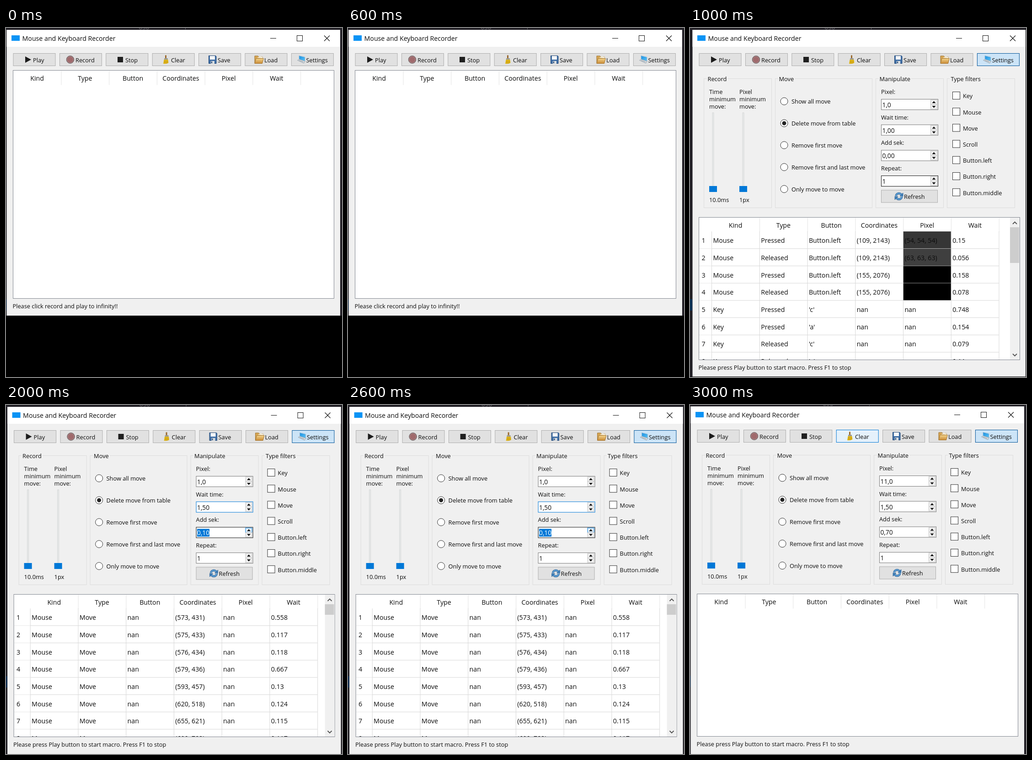
An HTML page for the animation above (4 s loop, 735 px wide and 762 px high).

```html
<!DOCTYPE html>
<html lang="en">
<head>
<meta charset="utf-8">
<title>Mouse and Keyboard Recorder</title>
<style>
  html, body { margin: 0; width: 100%; height: 100%; overflow: hidden; background: #211f25; }
  svg { display: block; width: 735px; height: 762px; }
  text { font: 12.8px "Open Sans", "Noto Sans", sans-serif; fill: #0c0c0c; white-space: pre; }
  .big { font-size: 14.2px; }
  .num { font-size: 13.8px; }
  .mid { text-anchor: middle; }
  .legend { paint-order: stroke; stroke: #f0f0f0; stroke-width: 6px; }
  .screen { visibility: hidden; animation: show 4s step-end infinite; }
  @keyframes show {
    0% { visibility: visible; }
    25%, 100% { visibility: hidden; }
  }
</style>
</head>
<body>
<svg id="stage" viewBox="0 0 735 762">
  <defs>
    <linearGradient id="folder" x2="0" y2="1"><stop stop-color="#f3d48c"/><stop offset="1" stop-color="#c98a35"/></linearGradient>
    <linearGradient id="glass" x2="1" y2="1"><stop stop-color="#1a8fe0"/><stop offset="1" stop-color="#5cc3f7"/></linearGradient>
    <radialGradient id="disc"><stop stop-color="#a4696c"/><stop offset=".75" stop-color="#9c6a6c"/><stop offset="1" stop-color="#8a7273"/></radialGradient>
    <clipPath id="view"><rect x="16" y="414" width="681" height="310"/></clipPath>
  </defs>
</svg>
<script>
const rect = (x, y, w, h, fill, stroke) =>
  `<rect x="${x}" y="${y}" width="${w}" height="${h}" fill="${fill}"${stroke ? ` stroke="${stroke}"` : ''}/>`;
const path = (d, fill = 'none', stroke = 'none', w = 1) =>
  `<path d="${d}" fill="${fill}" stroke="${stroke}" stroke-width="${w}"/>`;
const circle = (x, y, r, fill, stroke = 'none', w = 1) =>
  `<circle cx="${x}" cy="${y}" r="${r}" fill="${fill}" stroke="${stroke}" stroke-width="${w}"/>`;
const text = (x, y, s, cls = '', fill) =>
  `<text x="${x}" y="${y}" class="${cls}"${fill ? ` style="fill:${fill}"` : ''}>${s}</text>`;
const each = (list, fn) => list.map(fn).join('');

const HEADS = ['Kind', 'Type', 'Button', 'Coordinates', 'Pixel', 'Wait'];
const COL = 104.75, ROW = 37.7;

const icons = {
  Play: path('M42 62V76L55 69Z', '#1c1c1c'),
  Record: circle(140.5, 69, 8.3, 'url(#disc)', '#6f6668') + circle(140.5, 69, 6.6, 'none', '#b98a8b', .8),
  Stop: rect(244, 63, 12, 12, '#1f1f1f'),
  Clear: path('M348 59.5h3v7h-3z', '#9a6a2f') + path('M346 66h8v3h-8z', '#9b9b96')
    + path('M345.5 69h9l1 7q-4 3-11.5 2z', '#e0b81c') + path('M347 71v6M350 71v7M353 71v6', 'none', '#b98a0e', .8),
  Save: path('M443.5 60.5h15l1.5 1.5v15.5h-16.5z', '#3f6ea5', '#254a78') + rect(446, 61, 11, 8, '#f4f6f8')
    + rect(448, 72, 8, 6, '#d9dde0') + rect(449, 73, 2, 4, '#2b4d78'),
  Load: path('M544 77V61h7l2 2h8v4', '#d6a552', '#9d7434') + path('M544 77.5l3-11h16.5l-3 11z', 'url(#folder)', '#a87a35')
    + path('M549 65l6-3 6 1v3z', '#f6efdc'),
  Settings: path('M641 60.5l13 3v9l-13-4z', 'url(#glass)', '#a9c3d6') + path('M637.5 70.5l4-2 13 4-3 4.5z', '#d5dbe0', '#8f9ba5', .8)
    + path('M641 70.8l9.5 3.3', 'none', '#8f9ba5')
};
const LABEL_X = [59, 152, 261, 361, 463, 565, 656.5];

function button(x, y, w, h, state) {
  const [fill, line] = { on: ['#cce4f7', '#005499'], hover: ['#e5f1fb', '#0078d7'] }[state] || ['#e1e1e1', '#adadad'];
  return rect(x, y, w, h, fill, line);
}

function frame(bottom) {
  return rect(-10, 592, 11, 25, '#062f55')
    + text(290, 2.5, 'oso', 'big', '#68666c') + rect(392, 0, 1, 3, '#68666c')
    + rect(1.5, 4, 729.5, bottom - 4, '#f0f0f0') + rect(1.5, 4, 729.5, 37, '#fff')
    + rect(12, 16, 18, 12, '#0a93f5')
    + text(35.5, 28.3, 'Mouse and Keyboard Recorder', 'big')
    + rect(578, 22, 13, 1, '#111') + rect(636.5, 16.5, 12, 12, 'none', '#111')
    + path('M696 16.5l12 12M708 16.5l-12 12', 'none', '#111', 1.1);
}

function toolbar(states) {
  return each(Object.keys(icons), (name, i) =>
    button(16 + 101.4 * i, 55.5, 92, 27, states[name]) + icons[name] + text(LABEL_X[i], 74.5, name));
}

function group(x, w, title) {
  return rect(x, 110.5, w, 282, 'none', '#dcdcdc') + text(x + 8, 115.5, title, 'legend');
}

function slider(x, name, value) {
  return each([name, 'minimum', 'move:'], (s, i) => text(x, 143.5 + 16 * i, s))
    + rect(x + 7, 185, 3, 172, '#e7eaea', '#d6d6d6') + rect(x, 345, 17, 13, '#0078d7') + text(x, 379.5, value);
}

function spin(i, label, value, mode) {
  const y = 155.5 + 55.7 * i;
  const line = { focus: '#0078d7', dark: '#171717', pick: '#171717' }[mode] || '#7a7a7a';
  const pick = mode === 'pick';
  const up = pick ? ['#e5f1fb', '#0078d7'] : ['#f0f0f0', '#c4c4c4'];
  return text(414, y - 11.5, label) + rect(414.5, y, 124, 23, '#fff', line)
    + (pick ? rect(416.5, y + 3.5, 27, 17, '#0078d7') : '')
    + text(416.5, y + 17.3, value, 'num', pick ? '#fff' : '')
    + rect(522.5, y + 1.5, 14, 10, ...up) + rect(522.5, y + 11.5, 14, 10, '#f0f0f0', '#c4c4c4')
    + path(`M525.5 ${y + 8.5}h8l-4-4.5zM525.5 ${y + 14.5}h8l-4 4.5z`, '#111');
}

function refresh() {
  return button(414.5, 354, 123, 27)
    + circle(453, 367.5, 6.4, 'none', '#2d6296', 4.6) + circle(453, 367.5, 6.4, 'none', '#5b9bd0', 3)
    + path('M443 370l5-3M463 365l-5 3', 'none', '#e1e1e1', 2)
    + path('M455 367h7v-7zM451 368h-7v7z', '#3f7fb8', '#2d6296', .7)
    + text(464, 372.5, 'Refresh');
}

function settings(values, modes) {
  const moves = ['Show all move', 'Delete move from table', 'Remove first move', 'Remove first and last move', 'Only move to move'];
  const kinds = ['Key', 'Mouse', 'Move', 'Scroll', 'Button.left', 'Button.right', 'Button.middle'];
  return group(26.5, 148, 'Record') + slider(38, 'Time', '10.0ms') + slider(104, 'Pixel', '1px')
    + group(182.5, 212, 'Move')
    + each(moves, (s, i) => {
      const y = 160 + 47.9 * i;
      return circle(202, y, 8, '#fff', '#333') + (i === 1 ? circle(202, y, 4.5, '#222') : '') + text(218, y + 5.3, s);
    })
    + group(402.5, 148, 'Manipulate')
    + each(['Pixel:', 'Wait time:', 'Add sek:', 'Repeat:'], (s, i) => spin(i, s, values[i], modes[i]))
    + refresh()
    + group(558.5, 148, 'Type filters')
    + each(kinds, (s, i) => {
      const y = 148 + 35.2 * i;
      return rect(570.5, y - 8.5, 16, 16, '#fff', '#333') + text(593, y + 5.3, s);
    });
}

function table(top, bottom, left) {
  return rect(15.5, top, 702, bottom - top, '#fff', '#828790')
    + each(HEADS, (s, i) => text(left + COL * (i + .5), top + 22, s, 'big mid')
      + rect(left + COL * (i + 1), top + 1, 1, 31, '#e3e3e3'));
}

function rows(data, left, shades = []) {
  const top = 444.2, wide = COL * 6;
  const body = each(data, (line, r) => {
    const y = top + ROW * r;
    return (shades[r] ? rect(left + COL * 4 + .6, y, COL - .8, ROW, shades[r]) : '')
      + text(21.5, y + 25, r + 1, 'big')
      + each(line.split('|'), (s, c) => text(left + 3.2 + COL * c, y + 25, s, 'big'))
      + rect(16, y + ROW - .7, left - 16, 1, '#e8e8e8') + rect(left, y + ROW - .7, wide, 1, '#d8d8d8');
  });
  const grid = each([0, 1, 2, 3, 4, 5, 6], i => rect(left + COL * i - .2, top, 1, 280, '#d8d8d8'));
  return `<g clip-path="url(#view)">${grid}${body}</g>`;
}

function scrollbar(size) {
  return rect(696, 414, 21, 310, '#f0f0f0') + rect(696, 435, 20, size, '#cdcdcd')
    + path('M702 428l4.5-4.5 4.5 4.5M702 711.5l4.5 4.5 4.5-4.5', 'none', '#505050', 1.8);
}

const status = (y, s) => text(14.5, y, s);
const HINT = status(746, 'Please press Play button to start macro. Press F1 to stop');

const clicks = [
  'Mouse|Pressed|Button.left|(109, 2143)|(54, 54, 54)|0.15',
  'Mouse|Released|Button.left|(109, 2143)|(63, 63, 63)|0.056',
  'Mouse|Pressed|Button.left|(155, 2076)||0.158',
  'Mouse|Released|Button.left|(155, 2076)||0.078',
  "Key|Pressed|'c'|nan|nan|0.748",
  "Key|Pressed|'a'|nan|nan|0.154",
  "Key|Released|'c'|nan|nan|0.079",
  "Key|Released|'a'|nan|nan|0.11"
];
const moves = ['573, 431)|0.558', '575, 433)|0.117', '576, 434)|0.118', '579, 436)|0.667', '593, 457)|0.13',
  '620, 518)|0.124', '655, 621)|0.115', '690, 782)|0.117'].map(s => 'Mouse|Move|nan|(' + s.replace('|', '|nan|'));

// dark rim along the right and bottom edges of the stage
const RIM = path('M730.5 0V761.5H-4', 'none', '#0c0b0e');

const screens = [
  [0, 0, frame(628) + toolbar({}) + table(92.5, 590.5, 15.7)
    + status(611.8, 'Please click record and play to infinity!!') + rect(-10, 628, 760, 140, '#000')],
  [4, 0, frame(770) + toolbar({ Settings: 'on' })
    + settings(['1,0', '1,00', '0,00', '1'], ['', '', '', 'dark'])
    + table(413.5, 724.5, 43.2) + rows(clicks, 43.2, ['#363636', '#3f3f3f', '#000', '#000']) + scrollbar(78) + HINT + RIM],
  [1.6, 0, frame(770) + toolbar({ Settings: 'on' })
    + settings(['1,0', '1,50', '0,10', '1'], ['', 'focus', 'pick', ''])
    + table(413.5, 724.5, 51.3) + rows(moves, 51.3) + scrollbar(23) + HINT],
  [0, -1, frame(770) + toolbar({ Settings: 'on', Clear: 'hover' })
    + settings(['11,0', '1,50', '0,70', '1'], [])
    + table(413.5, 724.5, 15.7) + HINT]
];

document.getElementById('stage').insertAdjacentHTML('beforeend', each(screens, ([x, y, art], i) =>
  `<g class="screen" transform="translate(${x} ${y})" style="animation-delay:${i ? i - 4 : 0}s">${art}</g>`));
</script>
</body>
</html>
```
